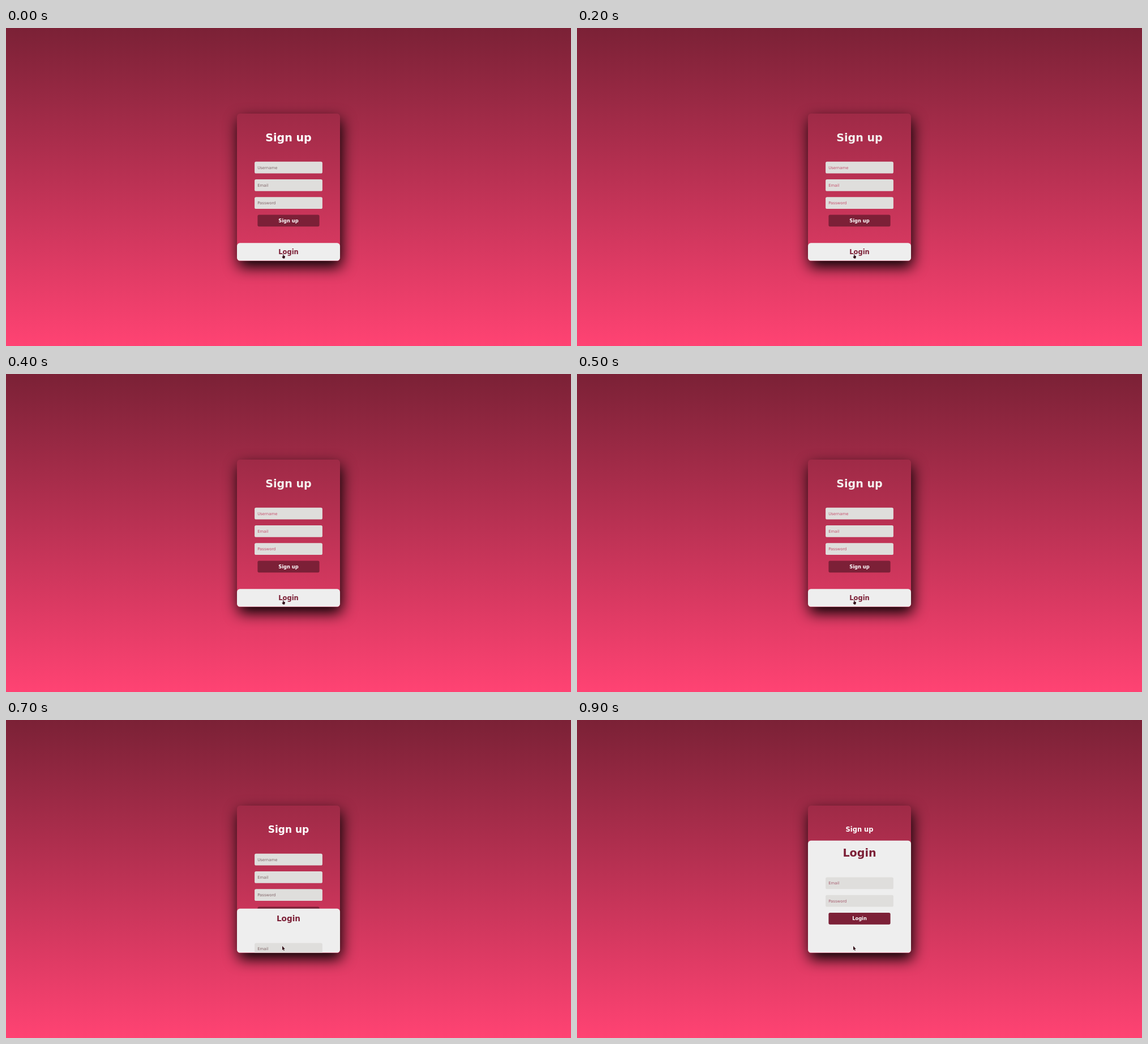
These frames come from a looping animation (998x561 px, 1000 ms). An HTML page:

```html
<!DOCTYPE html>
<html lang="en">
<head>
<meta charset="utf-8">
<title>Sign up and login card</title>
<style>
  html, body { margin: 0; width: 100%; height: 100%; overflow: hidden; }
  body { position: relative; background: linear-gradient(#7b2136, #ff4373); }
  .card {
    position: absolute; left: 408px; top: 150.5px; width: 182px; height: 260px;
    border-radius: 5.2px; box-shadow: 2.6px 10.4px 26px #000;
  }
  svg { position: absolute; left: 0; top: 0; width: 998px; height: 561px; }
  text { font-family: "DejaVu Sans", Verdana, sans-serif; }
  .title, .caption { font-weight: bold; text-anchor: middle; }
  .caption { font-size: 8.32px; fill: #fff; }
  .hint { font-size: 6.93px; }
  .field { fill: #dfdedc; }
  .button { fill: #7c2037; }
  .cursor { fill: #320d19; }
</style>
</head>
<body>
<div class="card"></div>
<svg viewBox="0 0 998 561">
  <clipPath id="cardClip"><rect x="408" y="150.5" width="182" height="260" rx="5.2"/></clipPath>
  <g clip-path="url(#cardClip)">
    <g id="signup"></g>
    <g id="panel">
      <rect x="408" width="182" height="240" rx="5.2" fill="#eee"/>
      <g id="login"></g>
    </g>
  </g>
  <path id="hand" class="cursor" d="M489.1 399.2q.6-.9 1.1 0v2.2l2 .6q.9.3.7 1.3l-.6 3.2h-3.1l-1.5-2.6q-.4-1 .5-.8l.9.5z"/>
  <path id="arrow" class="cursor" d="M488 398.8v7.2l1.6-1.5 1.2 2.6 1-.5-1.2-2.5h2.2z"/>
</svg>
<script>
  const LOOP = 1000, STEP = 100;
  const MID = 499, TITLE = 19.14, ROW = 31.2;
  const byId = id => document.getElementById(id);

  function add(parent, tag, attrs, content = '') {
    const el = document.createElementNS('http://www.w3.org/2000/svg', tag);
    for (const key in attrs) el.setAttribute(key, attrs[key]);
    el.textContent = content;
    return parent.appendChild(el);
  }

  // Rows of input fields followed by one button
  function buildForm(parent, hints, caption) {
    const rows = add(parent, 'g', {});
    hints.forEach((hint, i) => {
      add(rows, 'rect', { class: 'field', x: 439.1, y: i * ROW, width: 119.8, height: 20.8, rx: 2.6 });
      add(rows, 'text', { class: 'hint', x: 444.2, y: i * ROW + 12.8 }, hint);
    });
    const y = hints.length * ROW;
    add(rows, 'rect', { class: 'button', x: 444.4, y, width: 109.2, height: 20.8, rx: 2.6 });
    add(rows, 'text', { class: 'caption', x: MID, y: y + 13.3 }, caption);
    return rows;
  }

  const addTitle = (parent, fill, content) =>
    add(parent, 'text', { class: 'title', x: MID, fill }, content);

  function setTitle(el, center, scale) {
    const size = TITLE * scale;
    el.setAttribute('font-size', size);
    el.setAttribute('y', center + size * 0.35);
  }

  const moveY = (el, y) => el.setAttribute('transform', `translate(0 ${y})`);
  const show = (el, on) => el.setAttribute('visibility', on ? 'visible' : 'hidden');

  const signupTitle = addTitle(byId('signup'), '#fff', 'Sign up');
  const signupForm = buildForm(byId('signup'), ['Username', 'Email', 'Password'], 'Sign up');
  const loginTitle = addTitle(byId('login'), '#7c2037', 'Login');
  const loginForm = buildForm(byId('login'), ['Email', 'Password'], 'Login');
  const hints = document.querySelectorAll('.hint');
  moveY(signupForm, 235.8);

  function hintColor(tick) {
    if (tick === 0 || tick === 7) return '#806669';
    return tick < 7 ? '#c4506d' : '#a65c6e';
  }

  function draw(time) {
    const tick = Math.floor((time % LOOP) / STEP);
    const x = Math.min(1, Math.max(0, (tick - 6) / 2));
    const open = Math.pow(x, 1.84);

    moveY(byId('panel'), 379.2 - 166.4 * open);
    setTitle(signupTitle, 193.1, 1 - 0.4 * open);
    setTitle(loginTitle, 15.8 + 6 * open, 0.6 + 0.4 * open);
    moveY(loginForm, 59.2 + 5.5 * open);

    signupTitle.setAttribute('fill', tick > 0 && tick < 7 ? '#f4f0ee' : '#fff');
    hints.forEach(el => el.setAttribute('fill', hintColor(tick)));
    show(byId('hand'), open === 0);
    show(byId('arrow'), open > 0);
  }

  const start = performance.now();
  function loop() {
    draw(performance.now() - start);
    requestAnimationFrame(loop);
  }
  loop();
</script>
</body>
</html>
```
